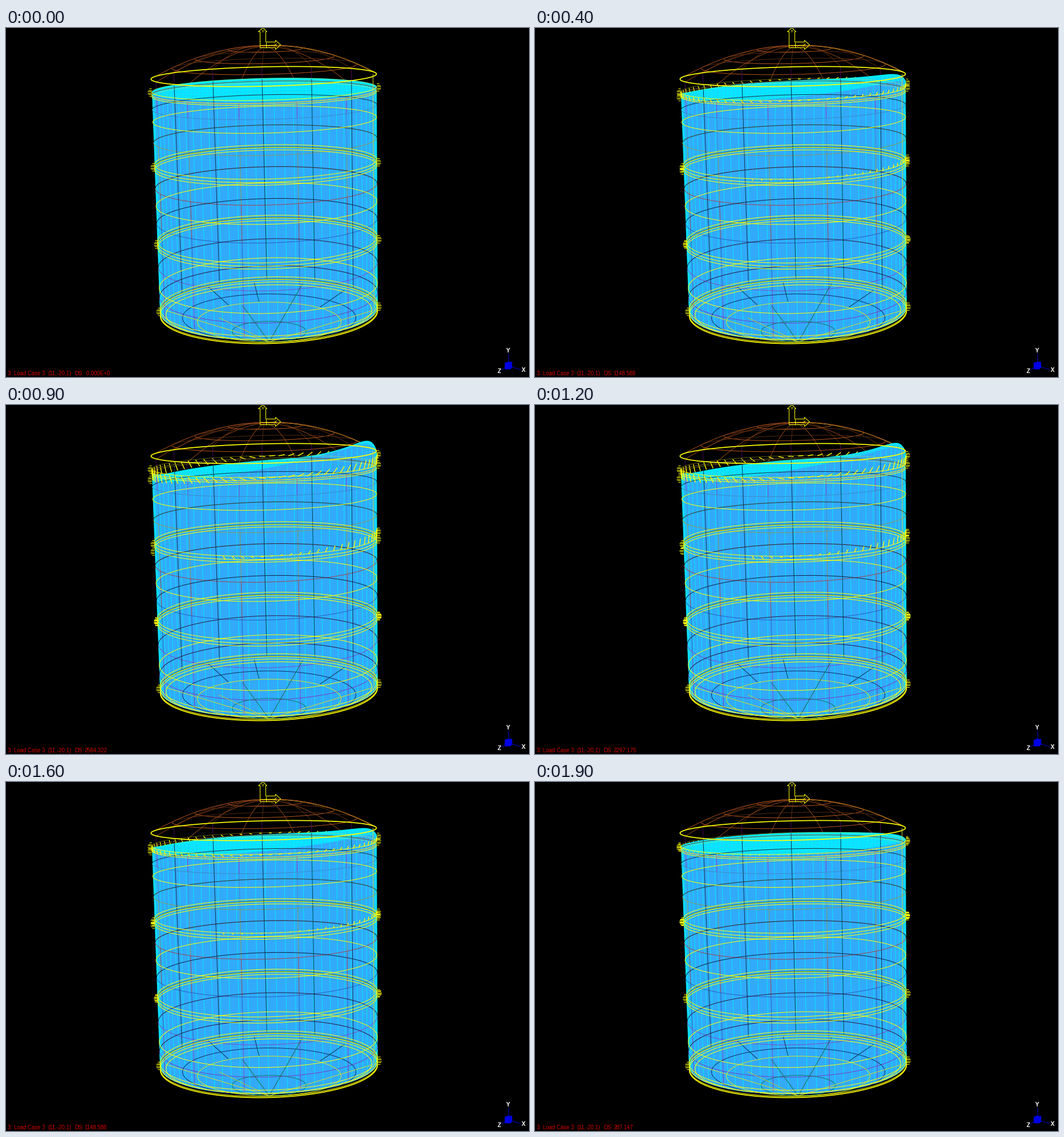
A matplotlib script that plays this animation: 917x611 px, repeating every 2 s.

```python
import numpy as np
import matplotlib.pyplot as plt
from matplotlib.animation import FuncAnimation
from matplotlib.collections import LineCollection
from matplotlib.colors import to_rgb
from matplotlib.patches import Polygon

W, H, DPI = 917, 611, 100
PX = 72 / DPI
STEPS = 10
PEAK = 2871.4692
YELLOW, CYAN, BLUE, RED = "#ffff00", "#00f0ff", "#32aafa", "#d80000"

fig = plt.figure(figsize=(W / DPI, H / DPI), dpi=DPI, facecolor="black")
ax = fig.add_axes([0, 0, 1, 1])
ax.set_xlim(-0.5, W - 0.5)
ax.set_ylim(H - 0.5, -0.5)
ax.axis("off")


def line(pts, color, width=1, z=6, alpha=1):
    x, y = np.transpose(pts)
    ax.plot(x, y, color=color, lw=width * PX, zorder=z, alpha=alpha,
            solid_capstyle="butt")


def bundle(color, width, z, alpha=1, **kw):
    group = LineCollection([], colors=color, linewidths=width * PX, zorder=z,
                           alpha=alpha, **kw)
    ax.add_collection(group)
    return group


def label(x, y, text, color, size, **kw):
    return ax.text(x, y, text, color=color, fontsize=size * PX, zorder=20,
                   family="Liberation Sans", **kw)


# phi: 0 right, 90 back, 180 left, 270 front
BACK = np.radians(np.linspace(0, 180, 100))
FRONT = BACK + np.pi
ROUND = np.radians(np.linspace(0, 360, 200))
FAR_RIBS = np.radians(39 + 26 * np.arange(5))
NEAR_RIBS = -np.radians(43 + 30 * np.arange(5))
STIFFENERS = (108, 239, 374, 492)
ROOF = 84.5


def sides(y):
    return 254 + (y - 89) * 0.0393, 649 + (y - 80) * 0.0045


def ring(cy, phi, inset=0):
    """Points of the tank wall's ring with centre height cy, in perspective."""
    left, right = sides(cy)
    b = 17 + (cy - ROOF) * 0.0865 - inset / 2
    x = (left + right) / 2 + ((right - left) / 2 - inset) * np.cos(phi)
    return np.column_stack([x, cy - 4.5 * np.cos(phi) - b * np.sin(phi)])


def rib(phi, top, bottom):
    return np.vstack([ring(top, [phi]), ring(bottom, [phi])])


def dome(s, phi):
    """Roof point at radius fraction s."""
    x = 452 + 197 * s * np.cos(phi) + 3 * (1 - s)
    y = ROOF - 54 * (1 - s ** 2) - s * (4.5 * np.cos(phi) + 17 * np.sin(phi))
    return np.column_stack([x, y])


def floor(r, phi):
    """Point of the conical bottom at radius r."""
    return np.column_stack([461 + r * np.cos(phi),
                            549 - r * (0.277 + 0.275 * np.sin(phi))])


def draw_roof():
    s = np.linspace(0, 1, 50)
    for phi in FAR_RIBS:
        line(dome(s, phi), "#54290f", z=2)
    for phi in NEAR_RIBS:
        line(dome(s, phi), "#8a4218", z=2)
    for r in (0.33, 0.62, 0.82):
        line(dome(r + 0 * BACK, BACK), "#54290f", z=2)
        line(dome(r + 0 * FRONT, FRONT), "#b4561f", z=2)
    for phi, color in ((2.9, "#a04a1c"), (0.16, "#e0c818"), (0.3, "#a04a1c")):
        line(dome(s, phi), color, z=2)
    for phi in np.append(FAR_RIBS, NEAR_RIBS):
        line(rib(phi, ROOF, 110), "#4a0a5a", z=2)
    line(ring(ROOF, ROUND), YELLOW, 1.7, z=8)


def draw_shell():
    levels = (112, 138, 196, 276, 337, 414, 466)
    tints = ("#8a3ccc", "#3c8cc8", "#8a9a58", "#a04450", "#2a60c0",
             "#7850c8", "#7440c0")
    for top, bottom, tint in zip(levels, levels[1:] + (490,), tints):
        line(ring(top, FRONT), tint)
        line(ring(top, BACK), 0.35 * np.array(to_rgb(tint)))
        for phi in NEAR_RIBS:
            line(rib(phi, top, bottom), tint)
    for phi in FAR_RIBS:
        line(rib(phi, 108, 490), "#0a3250")

    for cy in STIFFENERS[1:]:
        line(ring(cy - 1, BACK), "#507828")
        for d in (-5, 0.5, 5):
            line(ring(cy + d, ROUND), YELLOW, z=8)
    for cy in (160, 307, 450.5):
        line(ring(cy, ROUND), YELLOW, z=8)
    for cy in (107, 112, 115):
        line(ring(cy, BACK), YELLOW, z=8, alpha=0.35)
        line(ring(cy, FRONT), YELLOW, z=8)
    line(ring(499, FRONT), YELLOW, 1.7, z=8)
    line(ring(497, ROUND, 10), YELLOW, z=8)
    line(rib(0, ROOF, 497) - [6, 0], "#c8d23c", z=8)


def draw_floor():
    for r, color in ((152, "#0c3264"), (126, "#d2e628"), (65, "#0f7864")):
        line(floor(r, ROUND), color, z=7)
    spokes = np.radians(46 + 26 * np.arange(5))
    for i, phi in enumerate(spokes):
        inner, outer, color = 128, 190, "#0c3250"
        if i == 1:
            inner, color = 0, "#1e6450"
        if i == 4:
            inner, outer, color = 0, 102, "#b4c83c"
        line(floor(np.array([inner, outer]), phi), color, z=7)
    line(floor(np.array([0, 120]), np.radians(113)), "#1e6e50", z=7)
    for phi in (5, 175):
        line(floor(np.array([0, 182]), np.radians(phi)), "#d2dc28", z=7)


def draw_axes():
    line([(445, 34), (445, 6), (442, 6), (450, -1), (457, 6), (455, 6),
          (455, 24), (472, 24), (472, 21), (481, 29), (472, 37), (472, 34),
          (445, 34)], YELLOW, z=10)
    line([(445, 29), (471, 29)], YELLOW, z=10)
    line([(455, 24), (455, 34)], YELLOW, z=10)
    label(450, 8, "Y", YELLOW, 8, ha="center")
    label(472, 32, "X", YELLOW, 8, ha="center")
    for x, y, name in ((880, 567, "Y"), (907, 602, "X"), (864, 604, "Z")):
        line([(880, 591), (x, y - 3)], "#0000c8", z=10)
        label(x, y, name, "white", 10.5, ha="center", weight="bold",
              bbox=dict(fc="black", lw=0, pad=0.5))
    ax.add_patch(Polygon([(874, 586), (878, 584), (887, 584), (887, 594),
                          (884, 597), (874, 597)], color="#0000e6", lw=0, zorder=21))


draw_roof()
draw_shell()
draw_floor()
draw_axes()
for x, text in ((2, "3:"), (13, "Load Case 3"), (73, "(11,-20,1)"), (120, "DS:")):
    label(x, 607, text, RED, 9.7)
reading = label(137, 607, "", RED, 9.7)

# ---- moving liquid ----
body = Polygon([(0, 0)] * 3, fc=BLUE, lw=0, zorder=4)
surface = Polygon([(0, 0)] * 3, fc="#08e6ff", lw=0, zorder=5)
ax.add_patch(body)
ax.add_patch(surface)
wall = bundle(CYAN, 1, 5.2, 0.85)
ripple = bundle("#32beff", 1, 5.1, linestyles=(0, (3, 4)))
crest = bundle(CYAN, 1.5, 5.3)
back_ticks = bundle(YELLOW, 1.4, 3)
front_ticks = bundle(YELLOW, 1.4, 9)
hashes = bundle(YELLOW, 1, 9)

C = -np.cos(np.linspace(0, np.pi, 200))
S = np.sqrt(np.clip(1 - C ** 2, 0, 1))
XS = 452.5 + 196.5 * C
LEVEL = 108 - 4.5 * C
# heave of the far and near rims per unit of swing, held back at the wall
HELD = 1 - 0.55 * C ** 20
FAR_HEAVE = (9 - 11 * C - 46 * np.clip(C, 0, 1) ** 3) * HELD
NEAR_HEAVE = (-17 - 34 * C) * HELD
MERIDIANS = np.radians(np.arange(180, 361, 5))
NODES = np.radians(np.arange(0, 360, 5) + 2.5)


def share(cy):
    """How much of the swing reaches a ring at height cy."""
    return np.cos(min(1.4 * (cy - 108) / 386, 1) * np.pi / 2)


def ticks(cy, phi, run, lift):
    start = ring(cy, phi)
    c = np.cos(phi)
    move = np.column_stack([run * (1.2 - c ** 2), -lift * c])
    return list(np.stack([start, start + move], axis=1))


def hash_marks(x, y, side, n=6, gap=2.5):
    t = np.linspace(-1, 1, n)
    rows = y + t * gap * (n - 1) / 2
    return [[(x, r), (x + side * (7 - 2.5 * u * u), r)] for u, r in zip(t, rows)]


def draw(i):
    k = STEPS - abs(i - STEPS)
    swing = k / 9
    back = LEVEL - 20 * S + swing * FAR_HEAVE
    front = np.maximum(LEVEL + 20 * S + swing * NEAR_HEAVE, back)
    rim = np.column_stack([XS, back])
    lip = np.column_stack([XS, front])

    body.set_xy(np.vstack([rim, ring(494, FRONT)[::-1]]))
    surface.set_xy(np.vstack([rim, lip[::-1]]))
    crest.set_segments([rim])
    ripple.set_segments([rim + (lip - rim) * u for u in np.linspace(0.25, 0.9, 5)])

    u = np.linspace(0, 1, 16)
    lean = 7 * swing * np.clip(1 - 4 * u, 0, 1) ** 2
    strips = []
    for phi, (fx, fy) in zip(MERIDIANS, ring(494, MERIDIANS)):
        x = 452.5 + 196.5 * np.cos(phi)
        y = np.interp(x, XS, front)
        strips.append(np.column_stack([x + (fx - x) * u + lean * np.sin(phi) ** 2,
                                       y + (fy - y) * u]))
    for d in (1, 3):  # dense seams along both flanks
        strips.append([(256 + d, back[0]), (270 + d, 500)])
        strips.append([(649 - d, back[-1]), (650 - d, 490)])
    wall.set_segments(strips)

    far, near = NODES[NODES < np.pi], NODES[NODES > np.pi]
    low = near[np.cos(near) > -0.45]
    back_ticks.set_segments(ticks(108, far, 9 * swing, 18 * swing))
    front_ticks.set_segments(ticks(108, near, 10 * swing, 18 * swing)
                             + ticks(234.5, low, 4 * swing, 16 * swing))

    marks = []
    for cy in STIFFENERS:
        left, right = sides(cy)
        drift = 18 * swing * share(cy)
        for d in {0, drift}:
            marks += hash_marks(left, cy + 4 + d, -1)
            marks += hash_marks(right, cy - 5 - d, 1)
    hashes.set_segments(marks)

    reading.set_text(f"{PEAK * k / STEPS:.3f}" if k else " 0.000E+0")
    return ()


anim = FuncAnimation(fig, draw, frames=2 * STEPS, interval=100,
                     init_func=lambda: draw(0), repeat=True, repeat_delay=0)
plt.show()
```
